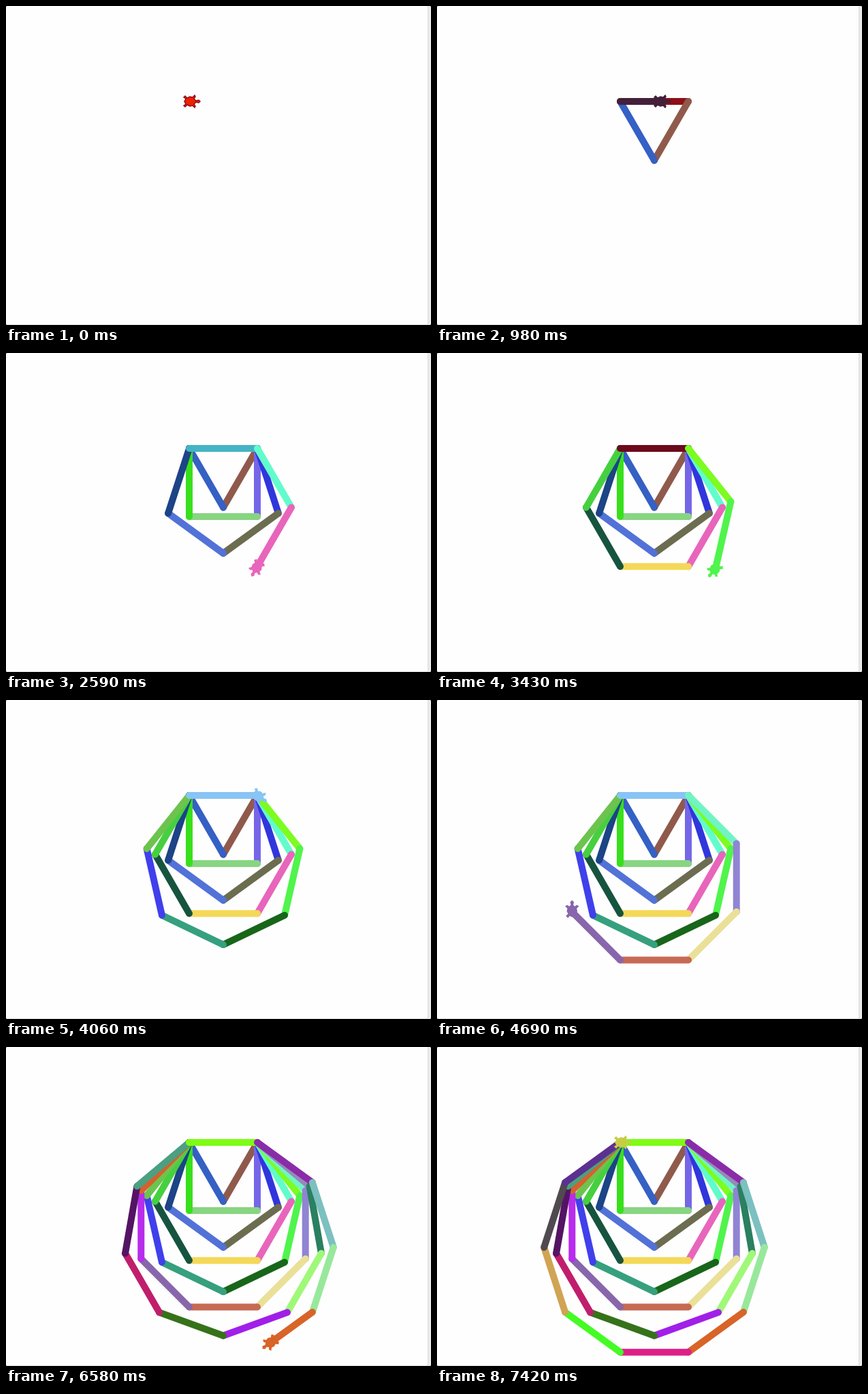
An HTML page with a canvas that plays this animation: 624 by 468 pixels, repeating every 7980 ms.

```html
<!DOCTYPE html>
<html lang="en">
<head>
<meta charset="utf-8">
<title>Turtle polygons</title>
<style>
html, body { margin: 0; width: 100%; height: 100%; overflow: hidden; background: #fff; }
canvas { display: block; }
</style>
</head>
<body>
<canvas id="stage" width="624" height="468"></canvas>
<script>
const ctx = document.getElementById("stage").getContext("2d");
const LOOP = 7980, HOLD = 490, TICK = 70, LAST = 100;
const SIDE = 100, HOPS = 9, TURN = 9;
const START = { x: 269, y: 140 };

// One row per polygon, from triangle to decagon
const colors = [
  "8c1018 8f5a4c 3560c4",
  "44203a 7566e8 88d582 38e01c",
  "5e1a36 3036dc 6c6c50 5272d8 1c4486",
  "44b4c4 62fccc e865bc f4d858 165440 46d040",
  "6c0a1c 7cfc20 50f44c 18661a 36a07e 4040ec 6cc44e",
  "88c4f4 70f4c4 9084d4 eae098 c66a54 8866ac b82cec d4622e",
  "c08018 968abc 2a8060 a0f878 a020e8 36721a c01e6c 541464 4aa080",
  "7efc14 8a2ca8 7cc0c0 98e89c d86428 dc2088 44fc24 d0a454 504a50 5c3090"
].map(row => row.split(" ").map(c => "#" + c));
const FIRST_FILL = "#f02000", END_COLOR = "#c8cc44";

// Pace: [tick, turtle steps done]
const pace = [[0, 0], [18, 167], [31, 280], [43, 377], [61, 530],
  [76, 648.5], [84, 714], [96, 818], [97, 827]];

// Right half of the turtle outline: across, ahead
const half = [[0, 16], [2, 14], [1, 10], [4, 7], [7, 9], [9, 8], [6, 5],
  [7, 1], [5, -3], [8, -6], [6, -8], [4, -5], [0, -7]];
const shell = half.concat(half.slice(1, -1).reverse().map(([x, y]) => [-x, y]));

// Every side with its geometry and its first step
const sides = [];
let total = 0;
for (const row of colors) {
  const angle = 360 / row.length;
  const turns = 1 + Math.floor(angle / TURN);
  let { x, y } = START;
  row.forEach((color, i) => {
    const a = i * angle * Math.PI / 180;
    const dx = SIDE * Math.cos(a), dy = SIDE * Math.sin(a);
    sides.push({ x, y, dx, dy, a, color, turns, turn: angle * Math.PI / 180, from: total });
    x += dx;
    y += dy;
    total += HOPS + turns;
  });
}

function stepsAt(tick) {
  const i = pace.findIndex(p => p[0] >= tick);
  if (i < 0) return total + 1;
  if (i === 0) return 0;
  const [t0, s0] = pace[i - 1], [t1, s1] = pace[i];
  return s0 + (s1 - s0) * (tick - t0) / (t1 - t0);
}

function drawWindow() {
  ctx.fillStyle = "#fefefe";
  ctx.fillRect(0, 0, 624, 468);
  ctx.fillStyle = "#eaeaea";
  ctx.fillRect(620, 0, 4, 468);
  ctx.fillStyle = "#dcdcdc";
  ctx.fillRect(619, 0, 1, 468);
  ctx.fillRect(0, 467, 624, 1);
  ctx.fillStyle = "#666";
  for (const x of [0, 623]) for (const y of [0, 467]) ctx.fillRect(x, y, 1, 1);
}

function drawTurtle(x, y, a, line, fill) {
  ctx.save();
  ctx.translate(x, y);
  ctx.rotate(a);
  ctx.beginPath();
  shell.forEach(([across, ahead]) => ctx.lineTo(ahead, across));
  ctx.closePath();
  ctx.fillStyle = fill;
  ctx.fill();
  ctx.lineWidth = 1.5;
  ctx.strokeStyle = line;
  ctx.stroke();
  ctx.restore();
}

function draw(time) {
  const tick = time < HOLD ? 0 : Math.min(LAST, Math.floor((time - HOLD) / TICK) + 1);
  const steps = stepsAt(tick);
  drawWindow();
  ctx.lineWidth = 10;
  ctx.lineCap = "round";
  let pose = { ...START, a: 0, line: sides[0].color, fill: FIRST_FILL };
  sides.forEach((s, i) => {
    const done = steps - s.from;
    if (done <= 0) return;
    const move = Math.min(1, done / HOPS);
    const turn = Math.max(0, Math.min(1, (done - HOPS) / s.turns));
    const x = s.x + s.dx * move, y = s.y + s.dy * move;
    ctx.strokeStyle = s.color;
    ctx.beginPath();
    ctx.moveTo(s.x, s.y);
    ctx.lineTo(x, y);
    ctx.stroke();
    pose = { x, y, a: s.a + s.turn * turn, line: s.color, fill: i ? s.color : FIRST_FILL };
  });
  if (steps > total) pose.line = pose.fill = END_COLOR;
  drawTurtle(pose.x, pose.y, pose.a, pose.line, pose.fill);
}

const begin = performance.now();
function loop() {
  draw((performance.now() - begin) % LOOP);
  requestAnimationFrame(loop);
}
loop();
</script>
</body>
</html>
```
